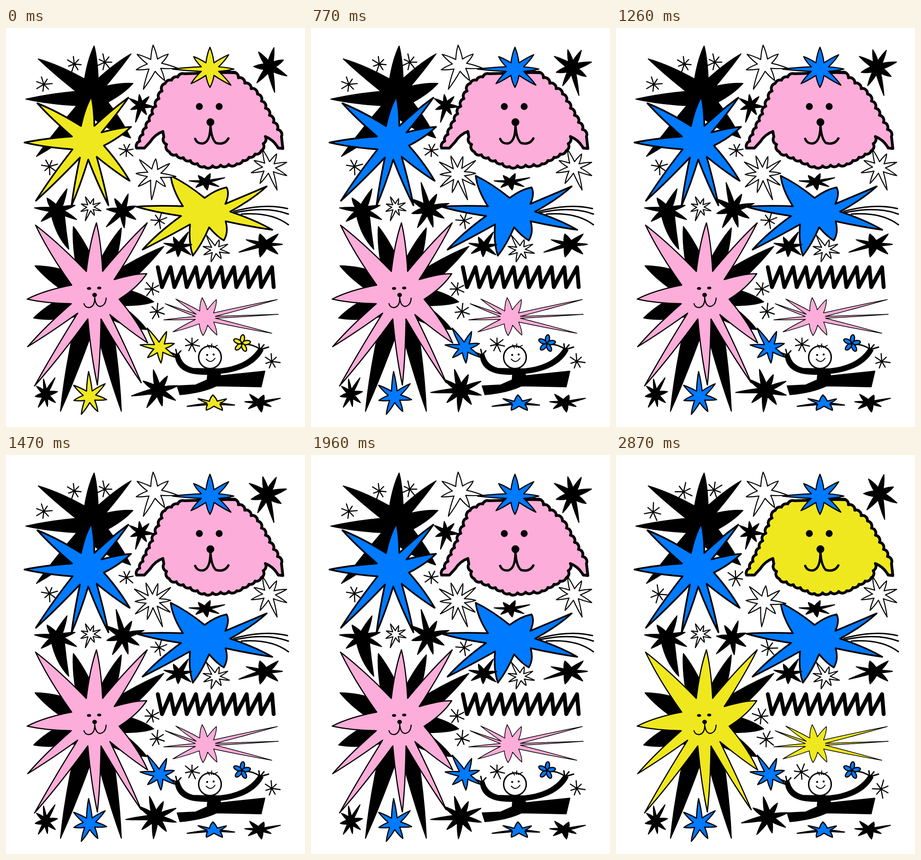
Write an HTML page that moves like this. It is 648x864 px and loops after 2940 ms.

```html
<!DOCTYPE html>
<html lang="en">
<head>
<meta charset="utf-8">
<title>Stars</title>
<style>
html, body { margin: 0; width: 100%; height: 100%; overflow: hidden; background: #fff; }
svg { display: block; width: 100vw; height: 100vh; }
svg * { stroke-linejoin: round; stroke-linecap: round; }
.ink { fill: #000; stroke: #000; stroke-width: 2; }
.paper { fill: #fff; stroke: #000; stroke-width: 2.2; }
.line { fill: none; stroke: #000; stroke-width: 2.4; }
.accent { fill: var(--accent); stroke: #000; stroke-width: 2.5; }
.main { fill: var(--main); stroke: #000; stroke-width: 2.5; }
.bold { stroke-width: 3.6; }
.wool { stroke-width: 6; }
.fine { stroke-width: 1.5; }
.hidden { display: none; }
</style>
</head>
<body>
<svg id="art" viewBox="0 0 648 864" xmlns="http://www.w3.org/2000/svg"></svg>
<script>
const art = document.getElementById('art');
const TAU = Math.PI * 2;
const path = (kind, d, width) => `<path class="${kind}" d="${d}" ${width ? `style="stroke-width:${width}"` : ''}/>`;
const dot = (x, y, rx, ry = rx) => `<ellipse cx="${x}" cy="${y}" rx="${rx}" ry="${ry}"/>`;
const group = (id, parts) => `<g id="${id}">${parts.join('')}</g>`;
const around = (x, y, rx, ry, a) => [x + rx * Math.cos(a), y + ry * Math.sin(a)];

// Leaf-shaped rays from an elliptical core to each tip, tips in clockwise order.
function rays(kind, x, y, coreX, coreY, tips) {
  const angle = ([tx, ty]) => Math.atan2(ty - y, tx - x);
  const notches = tips.map((tip, i) => {
    const a = angle(tip), b = angle(tips[(i + 1) % tips.length]);
    return around(x, y, coreX, coreY, a + ((b - a + TAU) % TAU) / 2);
  });
  const bulge = ([nx, ny], [tx, ty]) => {
    const k = .5, full = .4;
    return [nx + k * (tx - nx + full * (nx - x)), ny + k * (ty - ny + full * (ny - y))];
  };
  let d = 'M' + notches[tips.length - 1];
  tips.forEach((tip, i) => {
    const before = notches[(i || tips.length) - 1], after = notches[i];
    d += `Q${bulge(before, tip)} ${tip}Q${bulge(after, tip)} ${after}`;
  });
  return path(kind, d + 'Z');
}

// Evenly turned rays of uneven length; the first one, at `turn` degrees, is the longest.
function star(kind, x, y, rx, ry, count, turn) {
  const tips = Array.from({ length: count }, (_, i) => {
    const reach = i ? .95 + .12 * Math.sin(i * 2.4 + x) : 1.35;
    return around(x, y, rx * reach, ry * reach, turn * TAU / 360 + i * TAU / count);
  });
  return rays(kind, x, y, rx * .33, ry * .33, tips);
}

function asterisk(x, y, size, turn) {
  let d = '';
  for (let i = 0; i < 7; i++) {
    const r = size * (.9 + .15 * Math.sin(i * 2.4 + x));
    d += `M${x} ${y}L${around(x, y, r, r, turn + i * TAU / 7)}`;
  }
  return path('line', d);
}

// Outward bumps along a polyline that continues from its first point.
function woolly(...points) {
  let d = '';
  for (let i = 1; i < points.length; i++) {
    const [x0, y0] = points[i - 1], [x1, y1] = points[i];
    const count = Math.max(1, Math.round(Math.hypot(x1 - x0, y1 - y0) / 17));
    for (let j = 1; j <= count; j++) {
      const k = j / count;
      d += `A11 11 0 0 1 ${x0 + (x1 - x0) * k} ${y0 + (y1 - y0) * k}`;
    }
  }
  return d;
}

const sheep = 'M283 260' + woolly([283, 260], [318, 186], [345, 120], [386, 99])
  + 'L490 96' + woolly([490, 96], [545, 143], [597, 235])
  + 'L600 261L590 260Q580 242 562 235' + woolly([562, 235], [553, 266], [500, 294], [430, 300], [354, 268], [342, 236])
  + 'L340 224Q323 230 312 247L300 260Z';

let spring = 'M329 518';
for (let i = 0; i < 10; i++) spring += `L${329 + 27.5 * i} 518L${338 + 26.9 * i} 561`;

const petals = [0, 1, 2, 3, 4].map(i =>
  `<ellipse class="accent" cx="511" cy="673" rx="4.5" ry="9" transform="rotate(${i * 72 + 8} 511 683)"/>`).join('');

const spots = [[148, 78], [214, 74], [82, 122], [261, 265], [94, 300],
  [332, 417], [316, 565], [327, 614], [403, 685], [576, 722]];
const sparks = (size, turn, shift) =>
  spots.map(([x, y], i) => asterisk(x - shift, y + shift, size, turn + i * 1.7));

art.innerHTML = [
  // upper left bursts
  rays('ink', 186, 150, 36, 44, [[191, 39], [271, 56], [275, 120], [270, 238], [66, 278], [43, 154], [70, 67]]),
  rays('accent bold', 177, 247, 36, 38, [[185, 148], [265, 151], [271, 214], [268, 331], [222, 384], [142, 385], [65, 374], [40, 248], [68, 163]]),

  // sheep
  path('main wool', sheep),
  path('ink', 'M474 98Q486 88 497 99Z'),
  dot(419, 170, 7.5), dot(462, 170, 7.5), dot(443, 204, 8.5),
  path('line', 'M410 240Q414 251 427 250Q444 246 443 206Q444 239 455 249Q474 254 482 239', 5),
  star('accent', 442, 89, 60, 46, 8, 180),

  // middle comet
  path('line', 'M494 397Q560 379 610 391M496 400Q565 385 612 403M510 403Q575 398 612 426', 3),
  rays('accent bold', 432, 400, 54, 32, [[283, 387], [357, 320], [478, 345], [565, 343], [577, 437], [472, 460], [405, 493], [296, 480]]),

  // lion
  rays('ink', 195, 580, 60, 62, [[146, 430], [250, 433], [342, 473], [320, 593], [305, 653], [250, 830], [118, 830], [60, 628], [63, 515]]),
  rays('main', 192, 578, 54, 54, [[196, 422], [306, 422], [305, 532], [307, 682], [293, 768], [198, 773], [62, 775], [47, 690], [46, 587], [64, 427]]),
  dot(180, 564, 4.5, 3), dot(202, 563, 4.5, 3), dot(192, 578, 5, 4.5),
  path('line', 'M169 597Q172 607 182 605Q194 601 192 580Q193 602 204 603Q216 601 217 585'),

  path('line', spring, 8.5),
  rays('main fine', 432, 627, 22, 17, [[345, 597], [368, 587], [425, 584], [456, 588], [588, 588], [590, 620], [576, 661], [457, 665], [427, 666], [362, 658], [342, 632]]),

  // small stars
  star('paper', 322, 80, 48, 42, 7, 112),
  star('ink', 292, 168, 27, 28, 7, 108),
  star('paper', 570, 302, 42, 38, 8, 72),
  star('ink', 432, 333, 33, 19, 7, -20),
  star('ink', 110, 394, 48, 36, 7, -70),
  path('ink', 'M98 403Q108 450 136 479Q130 440 126 400Z'),
  star('paper', 183, 388, 24, 23, 8, 110),
  star('ink', 374, 473, 33, 26, 7, -62),
  star('paper', 454, 480, 31, 26, 8, -118),
  star('ink', 560, 469, 46, 27, 7, 153),
  star('accent', 333, 692, 40, 36, 7, -120),
  star('ink', 86, 793, 26, 32, 8, -55),
  star('accent', 181, 798, 42, 40, 7, -92),
  star('accent', 450, 813, 44, 18, 7, 165),
  star('ink', 549, 811, 36, 20, 7, -20),

  // jumping figure
  path('ink', 'M367 709L375 707Q381 731 405 737L440 738 463 738Q523 732 548 694L557 698Q535 740 464 748L465 753 561 743 553 777 456 775Q428 789 377 794L371 775 411 773 436 762 437 750Q370 752 367 709Z'),
  path('line', 'M371 709L368 696M370 708L357 703M371 708L379 699M550 697L548 684M551 696L559 686M552 696L569 691M551 696Q536 685 520 685', 3),
  '<circle class="paper" cx="442" cy="713" r="24.5" style="stroke-width:3"/>',
  path('line', 'M441 693L437 686M445 692L446 684M449 692L458 687M434 717Q444 728 453 715', 2),
  dot(436, 708, 2.2), dot(450, 707, 2.2),
  petals, dot(511, 683, 3),

  // alternate drawings
  group('starsA', [
    star('ink', 571, 84, 40, 42, 7, 78),
    star('paper', 321, 318, 46, 40, 8, 95),
    star('ink', 252, 396, 36, 36, 7, 135),
    star('ink', 330, 784, 44, 42, 8, 167)
  ]),
  group('starsB', [
    star('ink', 566, 86, 42, 46, 8, 75),
    star('paper', 318, 316, 46, 44, 10, 70),
    star('ink', 254, 392, 44, 44, 8, -105),
    star('ink', 324, 784, 48, 44, 9, 175)
  ]),
  group('sparksA', sparks(17.5, .1, 0)),
  group('sparksB', sparks(19.5, .45, 1.5))
].join('');

const STEP = 70, LOOP = 42;
const YELLOW = '#efe81e', BLUE = '#007aff', PINK = '#fcadd9';

function pose(name, variant) {
  for (const v of 'AB') document.getElementById(name + v).classList.toggle('hidden', v !== variant);
}

const start = performance.now();
let last = -1;
function draw(now) {
  const frame = Math.floor(Math.max(0, now - start) / STEP) % LOOP;
  if (frame !== last) {
    last = frame;
    const beat = frame % 7;
    art.style.setProperty('--accent', frame ? BLUE : YELLOW);
    art.style.setProperty('--main', 'PYPYPPY'[beat] === 'P' ? PINK : YELLOW);
    pose('stars', frame ? 'BBAABAA'[beat] : 'A');
    pose('sparks', 'AABBAAB'[beat]);
  }
  requestAnimationFrame(draw);
}
draw(start);
</script>
</body>
</html>
```
